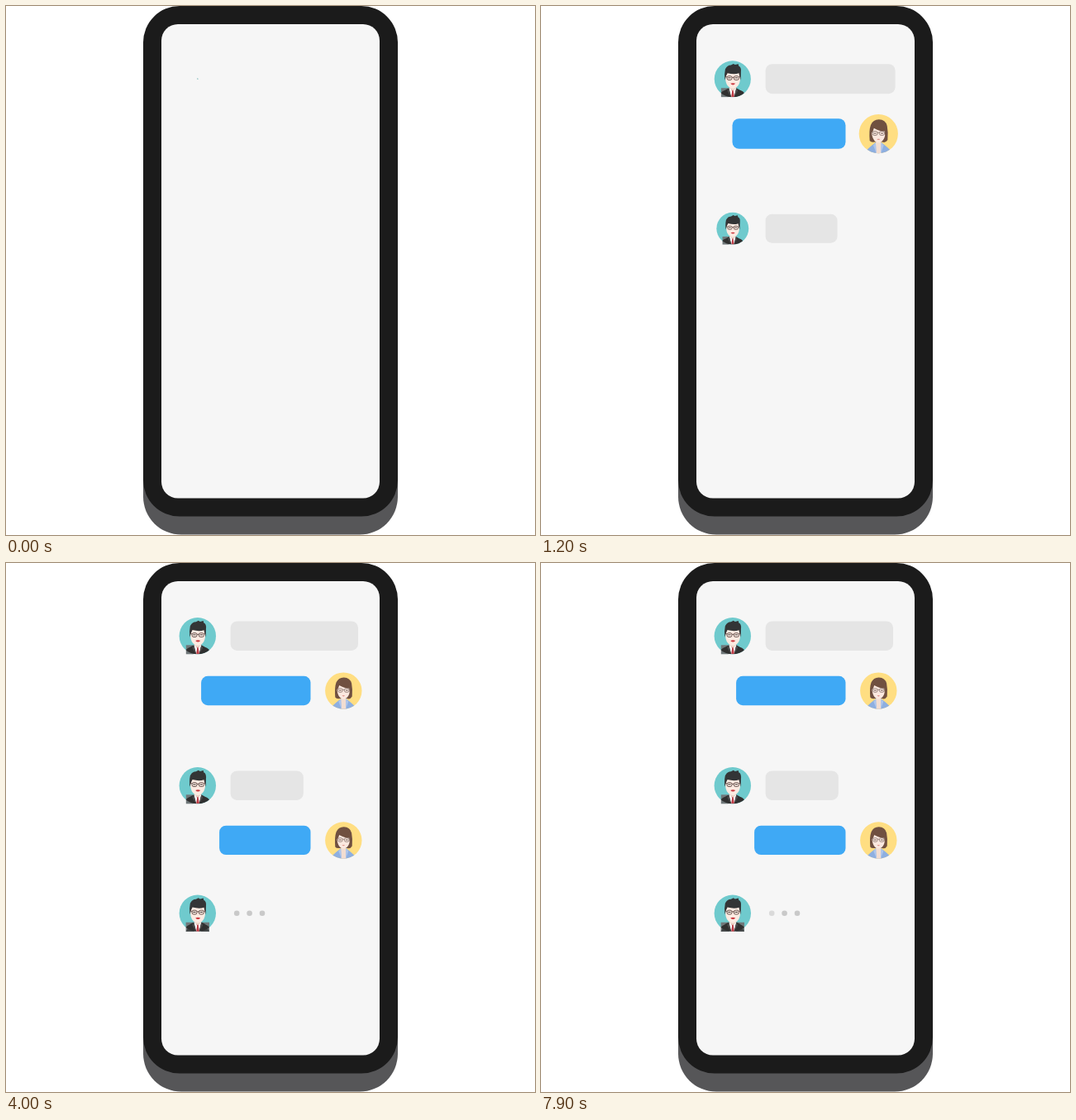
Recreate the animation shown at these times as an HTML page without scripts. Size 640 by 640 pixels, loop 8000 ms.

```html
<!DOCTYPE html>
<html lang="en">
<head>
<meta charset="utf-8">
<title>Chat on a phone</title>
<style>
  /* One clock in seconds drives every part; --s is a part's start time. */
  @property --t {
    syntax: "<number>";
    inherits: true;
    initial-value: 0;
  }
  @keyframes clock {
    from { --t: 0; }
    to { --t: 8; }
  }
  html, body {
    margin: 0;
    width: 100%;
    height: 100%;
    overflow: hidden;
    background: #fff;
  }
  svg {
    display: block;
    width: 100%;
    height: 100%;
    animation: clock 8s linear infinite;
  }
  .pop, .bar, .dot { --a: max(0, var(--t) - var(--s)); }

  /* Springy avatar: damped swing around full size */
  .pop {
    scale: calc(min(1, var(--a) / .08) *
      (1 + .852 * exp(-3.974 * var(--a)) * cos((var(--a) - .28) * 16.53)));
  }
  /* Bubble: quick growth, slight overshoot, slow settle */
  .bar {
    scale: calc(sin(min(1, var(--a) / .32) * 1.5708) *
      (1 + .0225 * (1 + cos((clamp(.4, var(--a), 1.35) - .4) * 3.307))));
  }
  /* Typing dot: fades in, then dips every 1.2 s around --dip */
  .dot {
    fill: #c9c9c9;
    opacity: calc(min(1, var(--a) * 10));
  }
  .blink {
    opacity: calc(min(1, var(--a) * 10) *
      min(1, .2 + 9 * (1 - cos((var(--t) - var(--dip)) * 5.23599))));
  }
  .grey { fill: #e5e5e5; }
  .blue { fill: #3fa9f5; }
</style>
</head>
<body>
<svg viewBox="0 0 640 640">
  <defs>
    <clipPath id="disc"><circle r="22.2"/></clipPath>

    <g id="suit">
      <path d="M-5 11H5L4 22H-4Z" fill="#fff"/>
      <path d="M-1.4 13H1.6L1 15L2.2 22H-1.6L-.7 15Z" fill="#bd3b45"/>
      <path d="M-15 19Q-14 15 -9 13.5L-4.5 11L-1.5 22H-15ZM15 19Q14 15 9 13.5L4.5 11L1.7 22H15Z" fill="#303030"/>
      <path d="M-4.5 11L-6.3 14.5L-2 22ZM4.5 11L6.3 14.5L2 22Z" fill="#4b4b4b"/>
    </g>

    <g id="head">
      <path d="M-3.5 7H4V11.5L.3 14.5L-3.5 11.5Z" fill="#ecd2c5"/>
      <path d="M-8.6 -8H9.2V1Q8.5 8 4 10.6Q.3 12.7 -3.4 10.6Q-8 8 -8.6 1Z" fill="#fcebe2"/>
      <path d="M-9.4 1.5Q-10.3 -6 -9 -12Q-6.5 -17 -2 -17L1 -18.5L3 -17.4L7 -18.2L7.4 -16Q10.8 -14.5 10.2 -9L9.8 1.5L8.4 -3.5L7.7 -7Q2 -5 -6.2 -7.2L-8 -3.5Z" fill="#333536"/>
      <g fill="none" stroke="#5b4540" stroke-width=".9">
        <rect x="-6.8" y="-3.6" width="6" height="4.8" rx="2"/>
        <rect x="1.6" y="-3.6" width="6" height="4.8" rx="2"/>
        <path d="M-9 -3.2L-6.8 -2.3M-.8 -2H1.6M7.6 -2.3L9.7 -3.2"/>
      </g>
      <path d="M-5.6 -1.4H-2.2M2.8 -1.4H6.2" stroke="#3f3735" stroke-width="1"/>
      <path d="M-2.6 5.6Q.4 4.5 3.4 5.6Q.4 8.8 -2.6 5.6Z" fill="#c9363c"/>
    </g>

    <g id="man">
      <circle r="22.2" fill="#6fcacd"/>
      <path d="M-14 11H-5V22H-14Z" fill="#70787a"/>
      <use href="#suit" clip-path="url(#disc)"/>
      <use href="#head"/>
    </g>

    <g id="typist">
      <circle r="22.2" fill="#6fcacd"/>
      <path d="M-14.2 11H-5V22H-14.2ZM5 11H14.2V22H5Z" fill="#70787a"/>
      <path d="M-14.2 22L-9 13L-5 11H5L9 13L14.2 22Z" fill="#404344"/>
      <use href="#suit" clip-path="url(#disc)"/>
      <use href="#head"/>
    </g>

    <g id="woman">
      <circle r="22.2" fill="#ffde82"/>
      <g clip-path="url(#disc)">
        <path d="M-15 20Q-9 14 -3.5 10H3.5Q9 14 15 20V23H-15Z" fill="#8eafe0"/>
        <path d="M-3.2 8H3.2L3 23H-2.6Z" fill="#f2ddd1"/>
        <path d="M-3.2 10L-6 13L-2.5 22ZM3.2 10L6 13L2.8 22Z" fill="#adc6ec"/>
      </g>
      <path d="M-10 8Q-11 -4 -8.8 -10Q-6 -16.3 .5 -16.2Q8 -16 9.8 -9Q11.2 -2 10.4 7Q8 11 4.4 9.4H-4.5Q-8.5 10 -10 8Z" fill="#705040"/>
      <path d="M-7.8 -1Q-5.8 -3 -5.2 -6.5Q1 -2.8 7 -2.8L7.4 2Q6.5 7 3 9.2Q0 10.8 -3 9.2Q-7 6.5 -7.8 -1Z" fill="#fbe8df"/>
      <g fill="none" stroke="#75615a" stroke-width=".7">
        <rect x="-6.7" y="-2.8" width="5.5" height="4.5" rx="1.8"/>
        <rect x="1.2" y="-2.8" width="5.5" height="4.5" rx="1.8"/>
        <path d="M-8 -2.3L-6.7 -1.5M-1.2 -1.3H1.2M6.7 -1.5L8 -2.3"/>
      </g>
      <path d="M-5.4 -.5H-2.6M2.6 -.5H5.4" stroke="#4d3a34" stroke-width=".8"/>
      <path d="M-1.8 6Q0 5.4 1.8 6Q0 7.6 -1.8 6Z" fill="#d57870"/>
    </g>
  </defs>

  <rect x="166" y="22" width="308" height="617.6" rx="46" fill="#565658"/>
  <rect x="166" width="308" height="617.6" rx="44" fill="#1b1b1b"/>
  <rect x="188" y="22" width="264" height="573.5" rx="20" fill="#f6f6f6"/>

  <!-- Bubbles grow from the side of their sender -->
  <g transform="translate(271.6 88.2)">
    <rect class="bar grey" style="--s:.25" y="-17.7" width="154.4" height="35.4" rx="8"/>
  </g>
  <g transform="translate(368.5 154.5)">
    <rect class="bar blue" style="--s:.5" x="-132.4" y="-17.7" width="132.4" height="35.4" rx="8"/>
  </g>
  <g transform="translate(271.6 269.2)">
    <rect class="bar grey" style="--s:.95" y="-17.7" width="88.2" height="35.4" rx="8"/>
  </g>
  <g transform="translate(368.5 335.4)">
    <rect class="bar blue" style="--s:1.25" x="-110.4" y="-17.7" width="110.4" height="35.4" rx="8"/>
  </g>

  <g transform="translate(231.8 88.3)"><use class="pop" style="--s:-.002" href="#man"/></g>
  <g transform="translate(408.3 154.6)"><use class="pop" style="--s:.55" href="#woman"/></g>
  <g transform="translate(231.8 269.3)"><use class="pop" style="--s:.72" href="#man"/></g>
  <g transform="translate(408.3 335.5)"><use class="pop" style="--s:1.38" href="#woman"/></g>
  <g transform="translate(231.8 423.8)"><use class="pop" style="--s:1.67" href="#typist"/></g>

  <circle class="dot blink" style="--s:1.9;--dip:1.96" cx="279.2" cy="423.8" r="3.3"/>
  <circle class="dot" style="--s:2.1" cx="294.6" cy="423.8" r="3.3"/>
  <circle class="dot blink" style="--s:2.25;--dip:2.37" cx="310" cy="423.8" r="3.3"/>
</svg>
</body>
</html>
```
